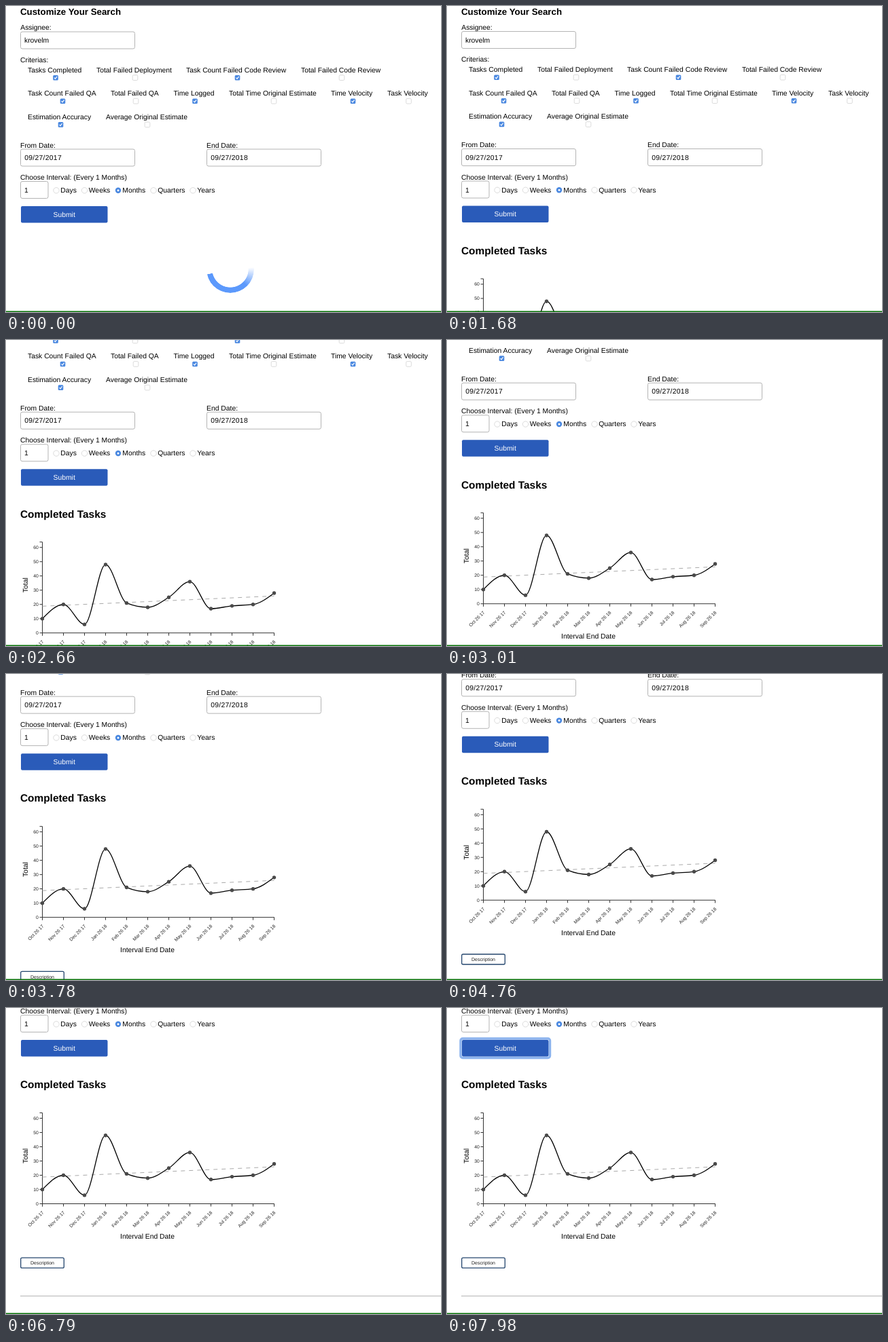
Animation, 640 px wide and 451 px high, one loop 8 s. Source, as an HTML page:

```html
<!DOCTYPE html>
<html lang="en">
<head>
<meta charset="utf-8">
<title>Search report</title>
<style>
  html, body { margin: 0; width: 100%; height: 100%; overflow: hidden; background: #fff; }
  svg { position: absolute; left: 0; top: 0; }
  text { font: 10.35px "Liberation Sans", Arial, sans-serif; text-rendering: geometricPrecision; }
  .title { font-size: 13.3px; font-weight: bold; }
  .heading { font-size: 15.4px; font-weight: bold; }
  .date { letter-spacing: .3px; }
  .mid { text-anchor: middle; }
  .end { text-anchor: end; }
  .small { font-size: 6.8px; fill: #222; }
  .button { font-size: 7px; fill: #222; }
  .white { fill: #fff; }
  .field { fill: #fff; stroke: #b4b4b4; }
  .off { fill: #fff; stroke: #d2d2d2; stroke-width: .8; }
  .on { fill: #4a88e0; }
  .tick { fill: none; stroke: #fff; stroke-width: 1.2; }
  .axis { fill: none; stroke: #333; }
  .curve { fill: none; stroke: #000; stroke-width: 1.3; }
  .trend { stroke: #aaa; stroke-dasharray: 6 6; }
  .dot { fill: #4a4a4a; }
  #spinner {
    position: absolute; left: 295px; top: 353px; width: 70px; height: 70px; border-radius: 50%;
    background: conic-gradient(from 85deg, #5c99fc00, #5c99fc 50deg 172deg, #5c99fc00 173deg);
    -webkit-mask: radial-gradient(circle, transparent 26.3px, #000 27px);
    mask: radial-gradient(circle, transparent 26.3px, #000 27px);
  }
</style>
</head>
<body>
<svg width="640" height="451" viewBox="0 0 640 451">
  <g id="page">
    <g id="form"></g>
    <rect id="ring" x="20" y="293" width="131.5" height="28.5" rx="3" fill="none" stroke="#8db4ee" stroke-width="3.4"/>
    <rect x="22" y="295" width="127.5" height="24.5" rx="2" fill="#2a5bb9"/>
    <text x="85.7" y="310.6" class="mid white">Submit</text>
    <g id="report"></g>
  </g>
  <rect y="449.5" width="640" height="1.5" fill="#0b750b"/>
</svg>
<div id="spinner"></div>
<script>
const byId = id => document.getElementById(id);
const text = (x, y, label, cls = '', extra = '') =>
  `<text x="${x}" y="${y}" class="${cls}" ${extra}>${label}</text>`;
const field = (x, y, width) =>
  `<rect class="field" x="${x}" y="${y}" width="${width}" height="25" rx="2.5"/>`;
const path = (d, cls) => `<path class="${cls}" d="${d}"/>`;

// Form
const criteria = [
  [97.5, [['Tasks Completed', 32, 73, 1], ['Total Failed Deployment', 133, 190, 0],
    ['Task Count Failed Code Review', 265, 340.5, 1], ['Total Failed Code Review', 434, 494, 0]]],
  [132, [['Task Count Failed QA', 32, 83.5, 1], ['Total Failed QA', 154, 191, 0],
    ['Time Logged', 246.5, 278, 1], ['Total Time Original Estimate', 328, 394, 0],
    ['Time Velocity', 478, 510.5, 1], ['Task Velocity', 561, 592.5, 0]]],
  [166.7, [['Estimation Accuracy', 32, 80.5, 1], ['Average Original Estimate', 147, 208, 0]]]
];
const intervals = [['Days', 74, 0], ['Weeks', 115.5, 0], ['Months', 165, 1], ['Quarters', 217, 0], ['Years', 275, 0]];

const checkbox = (x, y, on) =>
  `<rect class="${on ? 'on' : 'off'}" x="${x - 3.8}" y="${y - 3.8}" width="7.6" height="7.6" rx="1.5"/>` +
  (on ? path(`M${x - 2} ${y}l1.5 1.7l2.6 -3.6`, 'tick') : '');
const radio = (x, y, on) =>
  `<circle class="${on ? 'on' : 'off'}" cx="${x}" cy="${y}" r="4.2"/>` +
  (on ? `<circle class="white" cx="${x}" cy="${y}" r="1.5"/>` : '');

byId('form').innerHTML =
  text(21, 13, 'Customize Your Search', 'title') +
  text(21.3, 35, 'Assignee:') + field(21.5, 38, 168) + text(27, 54, 'krovelm') +
  text(21, 82.7, 'Criterias:') +
  criteria.map(([y, items]) => items.map(([label, x, boxX, on]) =>
    text(x, y, label) + checkbox(boxX, y + 8.2, on)).join('')).join('') +
  [['From Date:', 21.5, '09/27/2017'], ['End Date:', 295.5, '09/27/2018']].map(([label, x, date]) =>
    text(x - .4, 208.6, label) + field(x, 211, 168) + text(x + 5.7, 227.2, date, 'date')).join('') +
  text(21, 256, 'Choose Interval: (Every 1 Months)') + field(21.5, 258.5, 40.5) + text(27, 275, '1') +
  intervals.map(([label, x, on]) => radio(x, 271.8, on) + text(x + 6.3, 275, label)).join('');

// Chart
const totals = [10, 20, 6, 48, 21, 18, 25, 36, 17, 19, 20, 28];
const months = 'Oct Nov Dec Jan Feb Mar Apr May Jun Jul Aug Sep'.split(' ');
const left = 53.5, base = 536.5, step = 31, last = totals.length - 1;
const px = i => left + i * step;
const py = value => base - value * 2.1;

// Monotone cubic through the totals
function curvePath() {
  const rise = totals.slice(1).map((v, i) => v - totals[i]);
  const slope = totals.map((_, i) => {
    if (i === 0 || i === last) return 0;
    const a = rise[i - 1], b = rise[i];
    return (Math.sign(a) + Math.sign(b)) * Math.min(Math.abs(a), Math.abs(b), Math.abs(a + b) / 4);
  });
  slope[0] = (3 * rise[0] - slope[1]) / 2;
  slope[last] = (3 * rise[last - 1] - slope[last - 1]) / 2;
  return `M${px(0)} ${py(totals[0])}` + rise.map((_, i) =>
    `C${px(i + 1 / 3)} ${py(totals[i] + slope[i] / 3)} ${px(i + 2 / 3)} ` +
    `${py(totals[i + 1] - slope[i + 1] / 3)} ${px(i + 1)} ${py(totals[i + 1])}`).join('');
}

const mean = totals.reduce((a, b) => a + b) / totals.length;
const mid = last / 2;
const trend = totals.reduce((sum, v, i) => sum + v * (i - mid), 0) /
  totals.reduce((sum, _, i) => sum + (i - mid) ** 2, 0);

byId('report').innerHTML =
  text(21, 366.3, 'Completed Tasks', 'heading') +
  path(`M49.5 402.5H${left}V${base}`, 'axis') +
  path(`M${left} ${base + 4}V${base}H${px(last)}V${base + 4}`, 'axis') +
  [0, 10, 20, 30, 40, 50, 60].map(v =>
    path(`M49.5 ${py(v)}H${left}`, 'axis') + text(47.8, py(v) + 2.4, v, 'small end')).join('') +
  months.map((name, i) =>
    path(`M${px(i)} ${base}v4`, 'axis') +
    text(0, 0, `${name} 26 ${i < 3 ? 17 : 18}`, 'small end',
      `transform="translate(${px(i) + 2.4} 550) rotate(-45)"`)).join('') +
  text(0, 0, 'Total', 'mid', 'transform="translate(32 466) rotate(-90)"') +
  text(208, 588, 'Interval End Date', 'mid') +
  path(`M${left} ${py(mean - trend * mid)}L${px(last)} ${py(mean + trend * mid)}`, 'trend') +
  path(curvePath(), 'curve') +
  totals.map((v, i) => `<circle class="dot" cx="${px(i)}" cy="${py(v)}" r="2.7"/>`).join('') +
  '<rect x="21.7" y="616.2" width="63.6" height="15" rx="2" fill="#fff" stroke="#24466e" stroke-width="1.3"/>' +
  text(53.5, 626.4, 'Description', 'button mid') +
  '<path d="M21 672.5H640" stroke="#b4b4b4"/>';

// Motion
const LOOP = 8000, TICK = 70, LOADED = 630, FOCUSED = 7910;
const gestures = [ // start, end, from, to, skew
  [1610, 3290, 0, 161.5, 1.085],
  [3500, 3990, 161.5, 188.5, 1],
  [4550, 5110, 188.5, 235, 1],
  [5180, 5740, 235, 248, .8]
];

function scrollAt(t) {
  let y = 0;
  for (const [start, end, from, to, skew] of gestures) {
    if (t < start) break;
    const u = Math.min(1, (t - start) / (end - start)) ** skew;
    y = from + (to - from) * u * u * (3 - 2 * u);
  }
  return y;
}

const show = (id, on) => { byId(id).style.visibility = on ? 'visible' : 'hidden'; };

function draw(now) {
  const t = Math.floor(now % LOOP / TICK) * TICK;
  byId('page').setAttribute('transform', `translate(0 ${-scrollAt(t)})`);
  byId('spinner').style.transform = `rotate(${t * .36}deg)`;
  show('spinner', t < LOADED);
  show('report', t >= LOADED);
  show('ring', t >= FOCUSED);
}

let origin;
function loop(now) {
  origin ??= now;
  draw(now - origin);
  requestAnimationFrame(loop);
}
draw(0);
requestAnimationFrame(loop);
</script>
</body>
</html>
```
